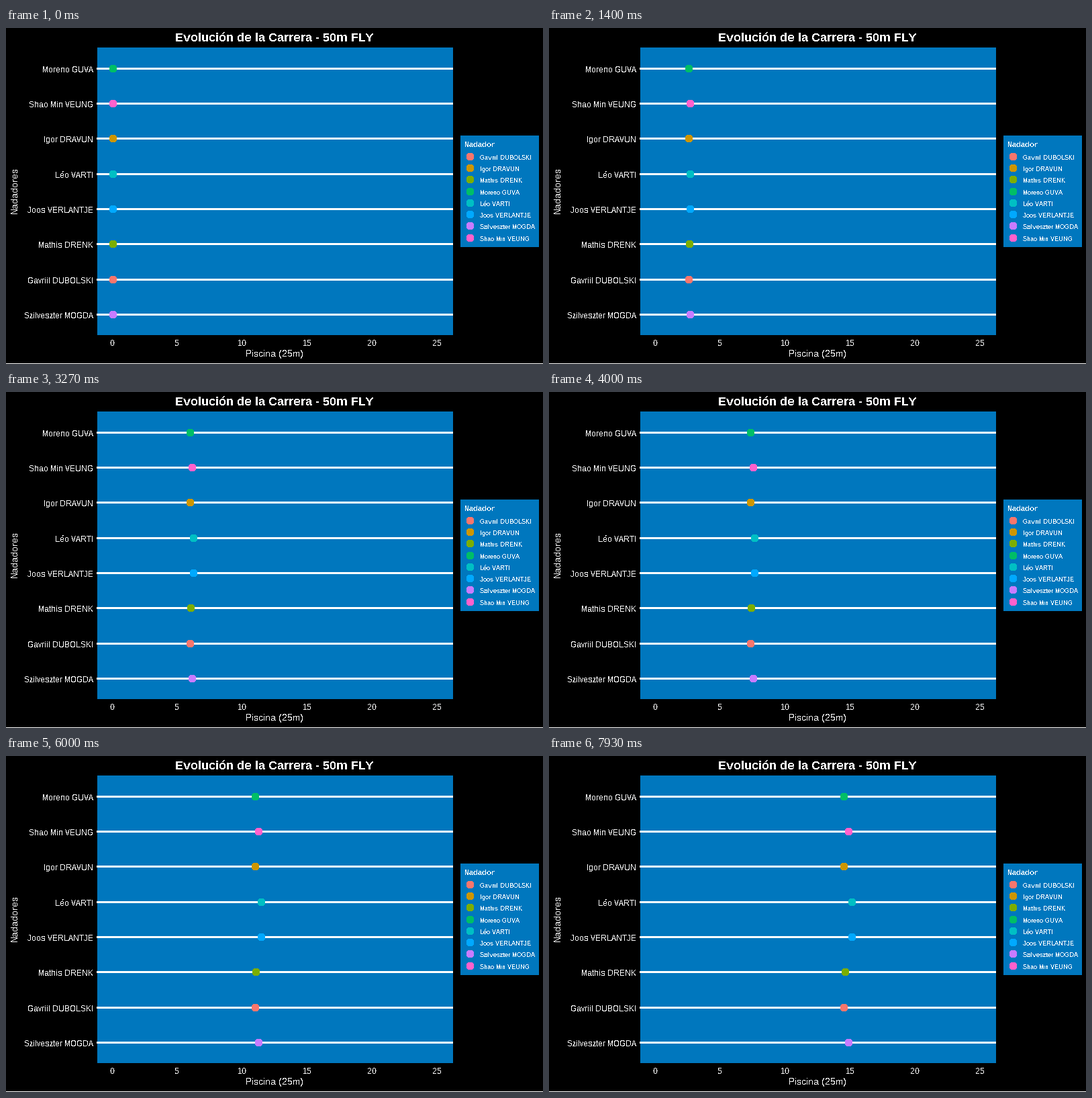
These frames come from a looping animation (800x500 px, 8000 ms). A matplotlib script:

```python
import numpy as np
import matplotlib.pyplot as plt
from matplotlib.animation import FuncAnimation
from matplotlib.patches import Rectangle

W, H, DPI = 800, 500, 100
FRAMES, INTERVAL = 400, 20
POOL = "#0077BE"
START_X = 159.33
DOT = 11

# name, colour, pixels per step; top lane first
SWIMMERS = [
    ("Moreno GUVA", "#00BE67", 2.357),
    ("Shao Min VEUNG", "#FF61CC", 2.415),
    ("Igor DRAVUN", "#CD9600", 2.357),
    ("Léo VARTI", "#00BFC4", 2.454),
    ("Joos VERLANTJE", "#00A9FF", 2.454),
    ("Mathis DRENK", "#7CAE00", 2.368),
    ("Gavriil DUBOLSKI", "#F8766D", 2.357),
    ("Szilveszter MOGDA", "#C77CFF", 2.415),
]
LEGEND_ORDER = [6, 2, 5, 0, 3, 4, 7, 1]

# Crisp text fitted to whole pixels
plt.rcParams.update({
    "font.family": "Liberation Sans",
    "text.hinting": "native",
    "text.hinting_factor": 1,
    "text.antialiased": False,
})
fig = plt.figure(figsize=(W / DPI, H / DPI), dpi=DPI, facecolor="black")
ax = fig.add_axes([0, 0, 1, 1])
ax.set_xlim(0, W)
ax.set_ylim(H, 0)
ax.axis("off")


def px(size):
    return size * 72 / DPI


def box(x0, y0, x1, y1, color):
    ax.add_patch(Rectangle((x0, y0), x1 - x0, y1 - y0, facecolor=color,
                           linewidth=0, antialiased=False))


def label(x, y, text, size, ha="center", **kw):
    ax.text(x, y, text, fontsize=px(size), color="white", ha=ha,
            va="baseline", **kw)


def dots(x, y, colors):
    return ax.scatter(x, y, s=px(DOT) ** 2, c=colors, linewidths=0,
                      antialiased=False, zorder=3)


names, colors, speeds = zip(*SWIMMERS)
speeds = np.array(speeds)
lanes = np.floor(60.3 + 52.3 * np.arange(8)) + 0.5

# Pool and lanes
box(136, 29, 666, 457, POOL)
for name, y in zip(names, lanes):
    box(135, y - 1.5, 666, y + 1.5, "white")
    label(130, y + 5.5, name, 12, ha="right")
box(0, 499, W, H, "white")

# Titles and axis
label(399.5, 20, "Evolución de la Carrera - 50m FLY", 18, weight="bold")
label(400, 489, "Piscina (25m)", 14)
label(17, 241, "Nadadores", 14, rotation=90, rotation_mode="anchor")
for i in range(6):
    label(158.2 + 96.8 * i, 473, str(5 * i), 12)

# Legend
box(677, 160, 794, 326, POOL)
label(683, 177, "Nadador", 11, ha="left", weight="bold")
keys = np.floor(191.2 + 17.28 * np.arange(8)) + 0.5
dots(np.full(8, 691.5), keys, [colors[i] for i in LEGEND_ORDER])
for i, y in zip(LEGEND_ORDER, keys):
    label(706, y + 4.5, names[i], 9, ha="left")


def positions(step):
    return np.floor(START_X + speeds * step) + 0.5


racers = dots(positions(0), lanes, colors)


def update(n):
    step = (3 * n + 2) // 10  # 15 steps per second
    racers.set_offsets(np.column_stack([positions(step), lanes]))
    return (racers,)


anim = FuncAnimation(fig, update, frames=FRAMES, interval=INTERVAL,
                     init_func=lambda: update(0), repeat=True,
                     repeat_delay=0, blit=False)
plt.show()
```
